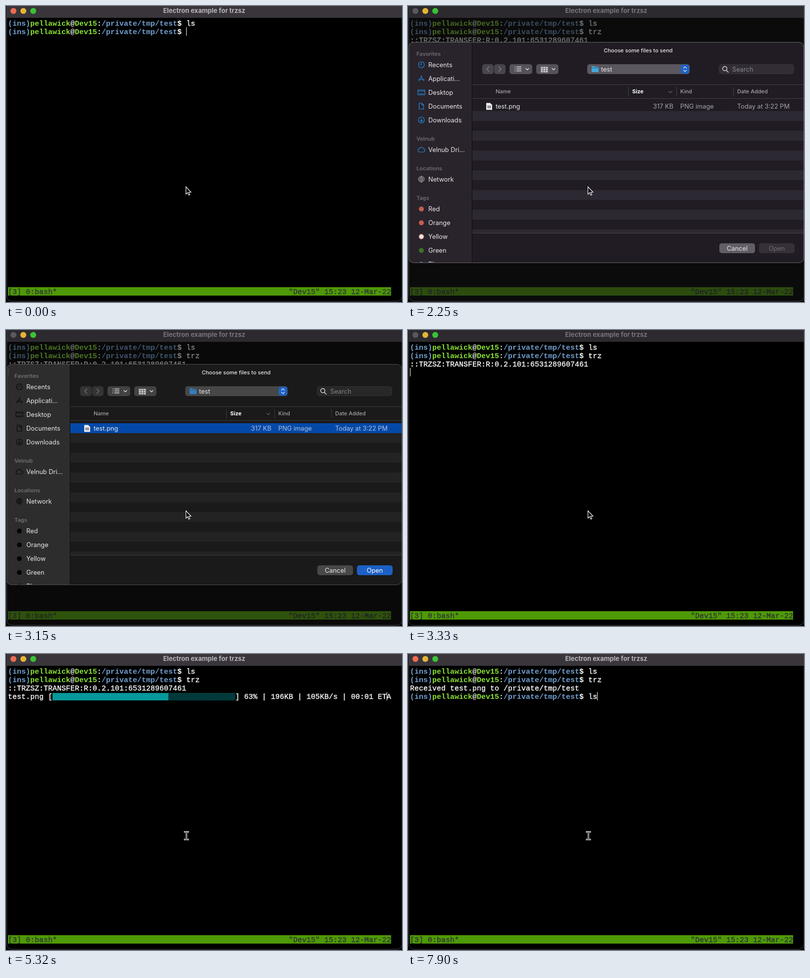
An HTML page that plays this animation: 800 px wide and 600 px high, repeating every 8000 ms.

```html
<!DOCTYPE html>
<html lang="en">
<head>
<meta charset="utf-8">
<title>Terminal file transfer</title>
<style>
html, body { margin: 0; width: 100%; height: 100%; overflow: hidden; background: #000; }
svg { display: block; width: 800px; height: 600px; }
text { font-family: Inter, sans-serif; }
.term text { font: 15px "Liberation Mono", monospace; fill: #fff; stroke: #fff; stroke-width: .35; }
.term .b { font-weight: 700; stroke: none; }
.term .blue { fill: #729fcf; }
.term .green { fill: #8ae234; }
.term .status { fill: #2e3436; stroke: #2e3436; }
#bar { fill: #39353b; }
#name { font-size: 13px; font-weight: 700; fill: #b8b5b9; }
#red { fill: #ed6b50; }
.idle #bar { fill: #2d2a2f; }
.idle #name { fill: #77747a; }
.idle #red { fill: #5b585d; }
#veil { fill: #131313; opacity: .58; }
#dialog {
  --side: #29242b; --body: #211c24; --stripe: #2d2932; --line: #434046; --edge: #68656b;
  --nav: #49454c; --ctl: #56525a; --pop: #5b575f; --field: #322d35; --btn: #625e66;
  --icon: #2389df; --net: #aaa7ad; --folder: #43a9dd; --dim: #a5a2a8; --head: #6f6b73;
}
#dialog.out {
  --side: #2d2d2d; --body: #1a1a1a; --stripe: #232323; --line: #3b3b3b; --edge: #505050;
  --nav: #343434; --ctl: #424242; --pop: #474747; --field: #282828; --btn: #484848;
  --icon: #090909; --net: #090909; --folder: #347fbd; --dim: #a2a2a2; --head: #717171;
}
#dialog text { font-size: 12.8px; fill: #e9e7ea; }
#dialog .small { font-size: 11px; font-weight: 500; }
#dialog .head { font-weight: 600; fill: var(--head); }
#dialog .dim { fill: var(--dim); }
#dialog .bold { font-weight: 700; fill: #fff; }
.ico { fill: none; stroke: var(--icon); stroke-width: 1.2; stroke-linecap: round; stroke-linejoin: round; }
.ico.net { stroke: var(--net); stroke-width: .8; }
.mark { fill: none; stroke: #dedce0; stroke-width: 1.4; stroke-linecap: round; stroke-linejoin: round; }
.out .tag { fill: #060606; stroke: none; }
#pick { fill: #0a4eb0; display: none; }
#open { fill: #353038; }
#dialog #openText { fill: #716d75; }
.picked #pick { display: inline; }
.picked #open { fill: #1c60c6; }
.picked #openText { fill: #fff !important; }
.picked .row.dim { fill: #a9bfe0 !important; }
.out #pick { fill: #0549a8; }
</style>
</head>
<body>
<svg id="stage" viewBox="0 0 800 600" xmlns="http://www.w3.org/2000/svg"></svg>
<script>
const LOOP = 8000, COL = 9, ROW = 17, LEFT = 4, TOP = 26, BASE = 14;
const colX = c => LEFT + c * COL;
const rowY = r => TOP + r * ROW;
const $ = id => document.getElementById(id);

const rect = (x, y, w, h, fill, rx = 0, more = '') =>
  `<rect x="${x}" y="${y}" width="${w}" height="${h}" rx="${rx}" fill="${fill}" ${more}/>`;
const dot = (x, y, r, fill, more = '') => `<circle cx="${x}" cy="${y}" r="${r}" fill="${fill}" ${more}/>`;
const path = (d, cls = 'mark', more = '') => `<path class="${cls}" d="${d}" ${more}/>`;
const label = (x, y, s, cls = '', more = '') => `<text x="${x}" y="${y}" class="${cls}" ${more}>${s}</text>`;
const mono = (col, row, s, cls = '') => label(colX(col), rowY(row) + BASE, s, cls);
const span = (cls, s) => `<tspan class="${cls}">${s}</tspan>`;

const prompt = (row, cmd) => mono(0, row,
  span('b blue', '(ins)') + span('b green', 'pellawick') + span('b', '@') + span('b green', 'Dev15') +
  span('b', ':') + span('b blue', '/private/tmp/test') + span('b', '$') + ' ' + cmd);

// Progress line, always 86 columns wide
function progress(pct) {
  const total = 311, size = total * pct / 100, rate = 99.9 + (pct - 33) * .163;
  const eta = Math.round((total - size) / rate);
  const tail = `] ${pct}% | ${size.toPrecision(3)}KB | ${rate.toPrecision(3)}KB/s | 00:0${eta} ETA`;
  const cells = 76 - tail.length, full = Math.round(cells * pct / 100), y = rowY(3) + 2;
  return mono(0, 3, 'test.png [') +
    rect(colX(10), y, full * COL, 15, '#06989a') +
    rect(colX(10 + full), y, (cells - full) * COL, 15, 'url(#shade)') +
    mono(10 + cells, 3, tail);
}

function sidebar() {
  const icons = {
    Recents: 'M-6 0a6 6 0 1 0 12 0a6 6 0 1 0-12 0M0-3.5V0H-3',
    'Applicati...': 'M-5 5L1-5M5 5L-1-5M-6 2H6',
    Desktop: 'M-7-5H7V5H-7zM-7-2.5H7M-5 3H5',
    Documents: 'M-4.5-6H1L4.5-2.5V6H-4.5zM1-6V-2.5H4.5',
    Downloads: 'M-6 0a6 6 0 1 0 12 0a6 6 0 1 0-12 0M0-3V3M-2.5.8L0 3.2L2.5.8',
    'Velnub Dri...': 'M-4 5a3.3 3.3 0 0 1-.6-6.4a4.6 4.6 0 0 1 8.6-.6a3.6 3.6 0 0 1 .4 7z',
    Network: 'M-6 0a6 6 0 1 0 12 0a6 6 0 1 0-12 0M-6 0H6M0-6V6M-5-3H5M-5 3H5M0-6q-6 6 0 12M0-6q6 6 0 12'
  };
  const item = (s, y, cls = 'ico') => label(41, y + 4.5, s) +
    path(icons[s], cls, `transform="translate(27 ${y})"`);
  const head = (s, y) => label(17, y + 4, s, 'small head');
  const tag = ([s, fill, ring], i) => label(41, 415.5 + i * 28, s) +
    dot(27, 411.5 + i * 28, 5, fill, `class="tag" stroke="${ring || 'none'}"`);
  return head('Favorites', 97) +
    ['Recents', 'Applicati...', 'Desktop', 'Documents', 'Downloads'].map((s, i) => item(s, 119 + i * 28)).join('') +
    head('Velnub', 269) + item('Velnub Dri...', 291) +
    head('Locations', 329) + item('Network', 351, 'ico net') + head('Tags', 389) +
    [['Red', '#c65d4e'], ['Orange', '#c65d4e'], ['Yellow', '#e6e2e2', '#c65d4e'],
     ['Green', '#3d7229'], ['Blue', '#2389df']].map(tag).join('');
}

function toolbar() {
  const chevron = (x, y) => path(`M${x - 3} ${y - 1.5}l3 3 3-3`);
  let s = label(465, 94, 'Choose some files to send', 'small', 'text-anchor="middle"') +
    rect(150, 118, 23, 20, 'var(--nav)', 5) + rect(174, 118, 23, 20, 'var(--nav)', 5) +
    path('M163.5 123.5l-4.5 4.5 4.5 4.5M183.5 123.5l4.5 4.5-4.5 4.5', 'mark', 'opacity=".4"') +
    rect(205, 118, 46, 20, 'var(--ctl)', 5) + rect(259, 118, 45, 20, 'var(--ctl)', 5);
  for (let i = 0; i < 3; i++) {
    const y = 123.5 + i * 4;
    s += path(`M216 ${y}h.5M219.5 ${y}h9`);
    s += path(`M268 ${y - .5}h15`, 'mark', 'opacity=".6" style="stroke-width:.8"');
    for (let j = 0; j < 3; j++) s += rect(268.5 + j * 5, y + .5, 4, 2.4, '#dedce0', .6);
  }
  return s + chevron(241, 128) + chevron(294, 128) +
    rect(362, 118, 207, 20, 'var(--pop)', 5) +
    path('M371 123q0-1 1-1h4l1.5 1.5h6.5q1 0 1 1v8.5q0 1-1 1h-12q-1 0-1-1z', '', 'fill="var(--folder)"') +
    rect(371, 125, 14, 1, '#1d638f') + label(390, 132.5, 'test') +
    rect(551, 119, 17, 18, '#1b62c8', 4.5) + path('M556.5 126l3-3 3 3M556.5 130l3 3 3-3') +
    rect(628.5, 118.5, 151, 19, 'var(--field)', 5, 'stroke="var(--line)" stroke-opacity=".6"') +
    dot(640, 127, 4.3, 'none', 'stroke="#dedce0" stroke-width="1.4"') + path('M643.3 130.5l3.7 3.7') +
    label(655, 132.5, 'Search', 'dim', 'opacity=".75"');
}

function fileList() {
  let s = rect(130, 159, 670, 1, 'var(--line)') + rect(130, 187, 670, 1, 'var(--line)');
  for (let y = 213; y < 460; y += 40) s += rect(130, y, 670, Math.min(20, 460 - y), 'var(--stripe)');
  for (const x of [445, 542, 657]) s += rect(x, 164, 1, 19, 'var(--line)');
  return s + label(177, 177, 'Name', 'small dim') + label(453, 177, 'Size', 'small bold') +
    path('M526.5 172.5l3.5 3.5 3.5-3.5', 'mark', 'opacity=".6" style="stroke-width:1"') +
    label(550, 177, 'Kind', 'small dim') + label(665, 177, 'Date Added', 'small dim') +
    '<rect id="pick" x="130" y="193" width="670" height="20"/>' +
    path('M158 196.5h8l4 4v10h-12z', '', 'fill="#ecebed"') + rect(160.5, 202, 7, 5, '#777a80') +
    rect(161.5, 204, 5, 1, '#ecebed') + label(177, 207.5, 'test.png') +
    label(536, 207.5, '317 KB', 'dim row', 'text-anchor="end"') +
    label(550, 207.5, 'PNG image', 'dim row') + label(665, 207.5, 'Today at 3:22 PM', 'dim row');
}

const dialog = () => '<g id="dialog"><g clip-path="url(#sheet)">' +
  rect(1, 73, 799, 448, 'var(--body)') + rect(1, 73, 128, 448, 'var(--side)') + rect(129, 73, 1, 448, '#0b0a0c') +
  sidebar() + toolbar() + fileList() + rect(130, 460, 670, 1, 'var(--line)') +
  rect(629, 481, 72, 20, 'var(--btn)', 5) + label(665, 495.5, 'Cancel', '', 'text-anchor="middle"') +
  '<rect id="open" x="709" y="481" width="72" height="20" rx="5"/>' +
  label(745, 495.5, 'Open', '', 'id="openText" text-anchor="middle"') + '</g>' +
  rect(1.5, 73.5, 798, 447, 'none', 10, 'stroke="var(--edge)"') + '</g>';

const beam = 'M361 360.5h1.5q2 0 2 2q0-2 2-2h1.5M364.5 362V374.5M361 376h1.5q2 0 2-2q0 2 2 2h1.5';

$('stage').innerHTML = `<defs>
  <pattern id="shade" x="94" y="79" width="3" height="4" patternUnits="userSpaceOnUse">
    ${rect(0, 0, 1.5, 1.5, '#06989a')}${rect(1.5, 2, 1.5, 1.5, '#06989a')}</pattern>
  <clipPath id="sheet">${rect(1, 73, 799, 448, '#000', 10)}</clipPath></defs>
  ${rect(0, 0, 800, 600, '#000')}
  <g class="term">${prompt(0, 'ls')}<g id="lines"></g>
    ${rect(4, 570, 774, 17, '#4e9a06')}${mono(0, 32, '[3] 0:bash*', 'status')}
    ${mono(63, 32, '"Dev15" 15:23 12-Mar-22', 'status')}</g>
  <rect id="veil" x="2" y="24" width="798" height="574"/>
  <rect id="bar" x="1" width="799" height="24"/>
  ${rect(1.5, -20, 798.5, 618.5, 'none', 10, 'stroke="#454347"')}
  <circle id="red" cx="15" cy="10" r="6"/>${dot(35, 10, 6, '#e5b335')}${dot(55, 10, 6, '#3bc235')}
  <text id="name" x="400.5" y="14" text-anchor="middle">Electron example for trzsz</text>
  ${dialog()}
  <rect id="caret" width="1" height="17" fill="#fff"/>
  ${path('M363.5 366.5v15l3.4-3.2 2.3 5.2 2.3-1-2.3-5h4.6z', '', 'id="arrow" fill="#000" stroke="#fff" stroke-width="1.1"')}
  <g id="beam" fill="none" stroke-linecap="square">${path(beam, '', 'stroke="#fff" stroke-width="2.8"')}${path(beam, '', 'stroke="#000"')}</g>`;

// Each step only lists what changes
const steps = [
  { at: 0, cmd: '', out: '', pct: null, next: null, caret: [40, 1], sheet: '', idle: false, beam: false },
  { at: 540, cmd: 't', caret: [41, 1] },
  { at: 730, cmd: 'tr', caret: [42, 1] },
  { at: 920, cmd: 'trz', caret: [43, 1] },
  { at: 1290, caret: [0, 2] },
  { at: 1480, out: '::TRZSZ:TRANSFER:R:0.2.101:6531289607461', caret: [0, 3] },
  { at: 2050, caret: null },
  { at: 2250, sheet: 'shown', idle: true },
  { at: 2580, sheet: 'picked' },
  { at: 3150, sheet: 'picked out', caret: [0, 3] },
  { at: 3330, sheet: '' },
  { at: 3600, idle: false, beam: true, caret: [85, 3] },
  ...[[3600, 6], [3768, 12], [3936, 18], [4104, 23], [4272, 28], [4440, 33], [4670, 41], [4876, 48],
      [5082, 55], [5288, 63], [5494, 70], [5700, 77], [5910, 85], [6060, 90], [6210, 95]]
    .map(([at, pct]) => ({ at, pct })),
  { at: 6210, caret: [0, 3] },
  { at: 6620, out: 'Received test.png to /private/tmp/test', pct: null, next: '', caret: [40, 3] },
  { at: 7220, caret: null },
  { at: 7840, next: 'l', caret: [41, 3] },
  { at: 7900, next: 'ls', caret: [42, 3] }
];
for (let i = 1; i < steps.length; i++) steps[i] = { ...steps[i - 1], ...steps[i] };

const show = (id, on) => { $(id).style.display = on ? 'inline' : 'none'; };

function draw(s) {
  $('lines').innerHTML = prompt(1, s.cmd) + mono(0, 2, s.out) +
    (s.pct !== null ? progress(s.pct) : s.next !== null ? prompt(3, s.next) : '');
  const out = s.sheet.includes('out');
  $('stage').setAttribute('class', s.idle ? 'idle' : '');
  $('dialog').setAttribute('class', s.sheet);
  $('dialog').setAttribute('transform', `translate(0 ${out ? -4 : 0})`);
  $('veil').style.opacity = out ? .52 : .58;
  show('dialog', s.sheet);
  show('veil', s.sheet);
  show('arrow', !s.beam);
  show('beam', s.beam);
  show('caret', s.caret);
  if (s.caret) {
    $('caret').setAttribute('x', colX(s.caret[0]));
    $('caret').setAttribute('y', rowY(s.caret[1]));
    $('caret').setAttribute('opacity', out ? .15 : 1);
  }
}

let last = null;
const start = performance.now();
function tick() {
  const t = Math.max(0, performance.now() - start) % LOOP;
  const step = steps.filter(s => s.at <= t).pop();
  if (step !== last) draw(last = step);
  requestAnimationFrame(tick);
}
tick();
</script>
</body>
</html>
```
